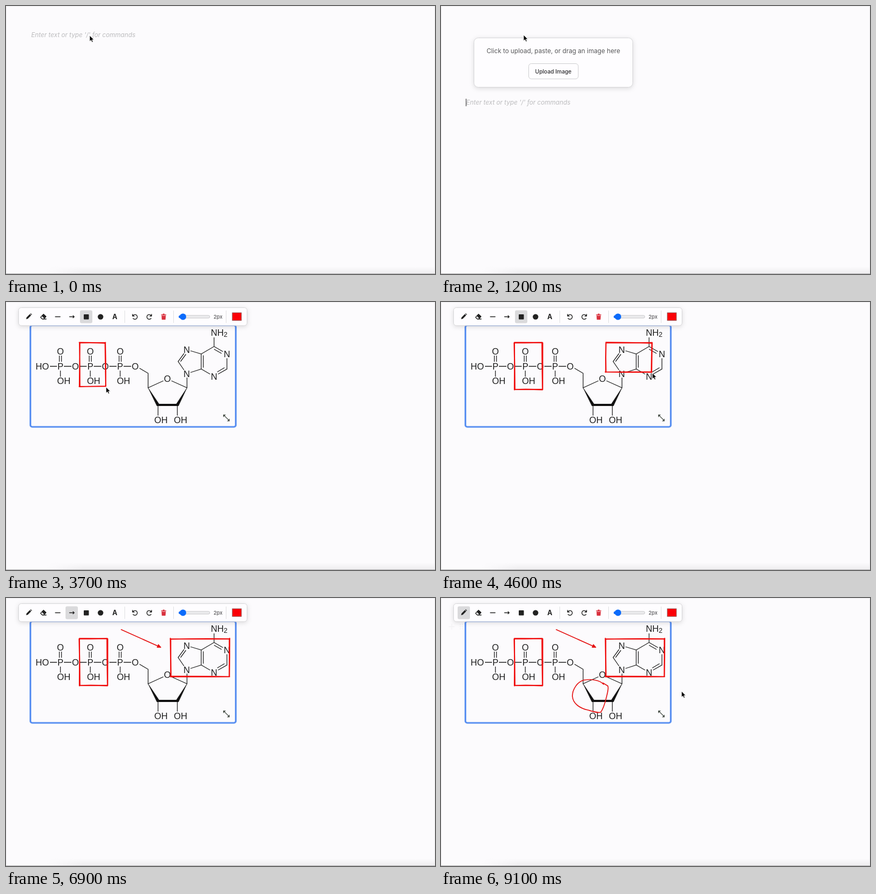
Write an HTML page that moves like this. It is 800 px wide and 500 px high and loops after 9200 ms.

```html
<!DOCTYPE html>
<html lang="en">
<head>
<meta charset="utf-8">
<title>Image annotation in an editor</title>
<style>
html, body { margin: 0; width: 100%; height: 100%; overflow: hidden; background: #fcfbfd; }
svg { display: block; width: 800px; height: 500px; font-family: Inter, "Open Sans", sans-serif; }
.ink { fill: none; stroke: #222; stroke-width: 1.3; }
.atoms { font: 16.6px "Liberation Sans", Arial, sans-serif; fill: #1c1c1c; }
.hint { font-size: 11.75px; font-style: italic; fill: #bcbcbe; }
.typed { font-size: 11.75px; fill: #333; }
.red { fill: none; stroke: #f00a0a; stroke-width: 2.1; stroke-linecap: round; stroke-linejoin: round; }
.thin { stroke: #e51313; stroke-width: 1.7; }
.icon { fill: none; stroke: #222; stroke-width: 1.4; stroke-linecap: round; stroke-linejoin: round; }
.panel { fill: #fefdff; stroke: #d6d6d8; filter: drop-shadow(0 2px 4px rgba(0, 0, 0, .13)); }
.sep { stroke: #dedee0; }
.item { font-size: 11px; font-weight: 500; fill: #3a3a3c; }
.note { font-size: 8.5px; fill: #8a8a8e; }
</style>
</head>
<body>
<svg viewBox="0 0 800 500">
  <defs>
    <linearGradient id="fadeY" x1="0" y1="0" x2="0" y2="1">
      <stop offset="0" stop-color="#000" stop-opacity="0"/>
      <stop offset="1" stop-color="#000" stop-opacity=".055"/>
    </linearGradient>
    <linearGradient id="fadeX">
      <stop offset="0" stop-color="#fcfbfd"/>
      <stop offset="1" stop-color="#fcfbfd" stop-opacity="0"/>
    </linearGradient>
  </defs>
  <rect width="800" height="500" fill="#fcfbfd"/>
  <rect x="75" y="486" width="725" height="13" fill="url(#fadeY)"/>
  <rect x="75" y="486" width="70" height="13" fill="url(#fadeX)"/>
  <path d="M.5 0V499M799.5 0V499M0 .5H800" stroke="#ececee"/>
  <path d="M0 499.5H800" stroke="#aaa9ab"/>

  <g id="handles" stroke="#c2c2c4">
    <path d="M14.5 53.5H25.5M20 48V59" stroke-width="1.3"/>
    <path d="M36 49.5V58M40 49.5V58" stroke-width="2.4" stroke-linecap="round" stroke-dasharray="0 4"/>
  </g>

  <text id="hint" class="hint" x="47">Enter text or type '/' for commands</text>
  <text id="typed" class="typed" x="47" y="57.5"></text>
  <path id="caret" stroke="#444" stroke-width="1.2"/>

  <g id="menu">
    <rect id="menuBox" class="panel" x="50.5" y="70.5" width="232" rx="6"/>
    <rect x="54" y="74" width="225" height="40" rx="4" fill="#efeff1"/>
    <g id="items"></g>
  </g>

  <g id="upload">
    <rect class="panel" x="61.5" y="59.5" width="296" height="92" rx="8"/>
    <text x="209.5" y="88" text-anchor="middle" font-size="11.75" fill="#58585a">Click to upload, paste, or drag an image here</text>
    <rect x="163.5" y="107.5" width="92.5" height="28.5" rx="5" fill="#fefdff" stroke="#cdcdcf"/>
    <text x="209.5" y="125.7" text-anchor="middle" font-size="10.25" font-weight="500" fill="#2c2c2e">Upload Image</text>
  </g>

  <g id="figure">
    <path class="ink" d="M82 120H95M249 123.5L265 133V160L293.5 147M308.5 147L337.5 160V141
      M283.5 192V212M319.5 192V212
      M344 131.5L364 125V97L344 91M332 127L321 111L332 96M325.5 111L335.5 97.5
      M364 97L388 83V66M388 83L404.5 92.5M388 88L402 96M412 105V125L395.5 134.5M407.5 122.5L394 130.5
      M380.5 134.5L364 125M368 122.5V99.5"/>
    <path d="M265 160L281.5 194L285.5 190.5ZM337.5 160L321.5 194L317.5 190.5Z" fill="#111" stroke="#111" stroke-width=".6"/>
    <path d="M282 192H321" stroke="#111" stroke-width="4"/>
    <path id="bonds" class="ink"/>
    <g id="atoms" class="atoms" text-anchor="middle">
      <text x="67.7" y="120">HO</text>
      <text x="382" y="57" text-anchor="start">NH<tspan font-size="12.5" dy="2.5">2</tspan></text>
    </g>
    <rect id="frame" x="45.5" y="43.5" width="383" height="189.5" rx="3.5" fill="none" stroke="#5a90f1" stroke-width="3.2"/>
  </g>

  <g class="red">
    <path id="box1"/>
    <path id="box2"/>
    <path id="arrow" class="thin" fill="#e51313"/>
    <path id="loop" class="thin" d="M303 161C296 153 281 151 267 153C254 156 245 171 245 183C246 198 260 206 274 209
      C284 212 293 215 298 213C304 205 307 191 309 183C311 174 313 168 311 164L302 158.5"/>
  </g>

  <g id="tools">
    <g fill="#4a524a">
      <path d="M407 212L415.5 220.5" stroke="#4a524a" stroke-width="1.3"/>
      <path d="M405 210h5l-5 5zM417 222.500h-5l5-5z"/>
    </g>
    <rect class="panel" x="23.5" y="10.5" width="426" height="33.5" rx="5"/>
    <rect id="pick" x="-11.5" y="15.5" width="23" height="24" rx="3" fill="#dadadc"/>
    <path class="sep" d="M221.5 16V39M312.5 16V39M410.5 16V39"/>
    <path d="M37.500 32l.8-3.2 6.2-6.2 2.4 2.4-6.2 6.2zM45.2 21.9l.9-.9 2.4 2.4-.9.9z" fill="#222"/>
    <g class="icon">
      <path d="M64.5 28.5L70 23L74.5 27.3L70 31.8H67.6Z"/>
      <path d="M67.3 25.8L70 23L74.5 27.3L71.7 30Z" fill="#222"/>
      <path d="M70 31.8H75M92 27.5H101M118.5 27.5H127M125 25.5L127.2 27.5L125 29.5"/>
      <path id="undo" d="M236 23V26.2H239.2M236.4 26A4.4 4.4 0 1 1 237 30.6"/>
      <use href="#undo" transform="translate(507.5)scale(-1 1)"/>
    </g>
    <rect x="145" y="23" width="9.5" height="9.5" rx="1" fill="#222"/>
    <circle cx="176.3" cy="27.6" r="5.2" fill="#222"/>
    <text x="203" y="32.2" text-anchor="middle" font-size="12.5" font-weight="700" fill="#222">A</text>
    <path d="M289.3 23.2h9.4v1.5h-9.4zM292.3 21.8h3.4v1.4h-3.4zM290 25.6h8l-.6 7.4h-6.8z" fill="#d9303e"/>
    <rect x="322.5" y="25" width="57.5" height="5" rx="2.5" fill="#ececee" stroke="#bcbcbe" stroke-width=".8"/>
    <path d="M324.5 27.5H330" stroke="#0b6bfb" stroke-width="5" stroke-linecap="round"/>
    <circle cx="330" cy="27.5" r="6" fill="#0b6bfb"/>
    <text x="387" y="31" font-size="9.5" fill="#3a3a3c">2px</text>
    <rect x="422" y="20" width="17" height="14.5" fill="#fb0007" stroke="#8a5a5a" stroke-width=".9"/>
  </g>

  <path id="cursor" d="M0 0V11L2.6 8.7L4.4 12.5L6.3 11.7L4.6 7.9H7.9Z" stroke="#fff" stroke-width=".8"/>
</svg>

<script>
const LOOP = 9200, STEP = 100, GLIDE = 500;
const $ = id => document.getElementById(id);
const show = (id, on) => { $(id).style.display = on ? '' : 'none'; };
const set = (id, name, value) => $(id).setAttribute(name, value);
const clamp = (v, lo = 0, hi = 1) => Math.min(hi, Math.max(lo, v));
const easeOut = u => 1 - (1 - u) ** 3;
const mix = (a, b, k) => a + (b - a) * k;

// Molecule: atom labels centred on their points, phosphate units repeated
const label = (text, x, y) => `<text x="${x}" y="${y}">${text}</text>`;
const ringN = [[337, 134], [337, 89], [412, 97], [388, 139]];
let bonds = '', labels = label('O', 301, 143.5) + label('OH', 289, 220.5) + label('OH', 325.5, 220.5);
for (const [x, y] of ringN) labels += label('N', x, y);
for (let i = 0; i < 3; i++) {
  const x = 101.5 + i * 55.7;
  bonds += `M${x - 2} 100V111.5M${x + 2} 100V111.5M${x} 128V139.5M${x + 6.5} 120h14`;
  if (i < 2) bonds += `M${x + 35.5} 120h13.5`;
  labels += label('O', x, 92.5) + label('P', x, 120) + label('O', x + 28, 120) + label('OH', x + 6.2, 147.8);
}
set('bonds', 'd', bonds);
$('atoms').insertAdjacentHTML('beforeend', labels);
set('atoms', 'transform', 'translate(0 5.5)');

const entries = [
  ['Image', 'Insert an image'], ['Image grid', 'Show images side by side'],
  ['Heading 1', 'Top-level heading'], ['Heading 2', 'Key section heading'],
  ['Numbered List', 'List with ordered items'], ['Bullet List', 'List with unordered items'],
  ['Check List', 'List with checkboxes'], ['Paragraph', 'The body of your document'],
  ['Table', 'Table with editable cells']
];
$('items').innerHTML = entries.map(([name, note], i) => `<g transform="translate(0 ${74 + i * 43})">
  <rect x="61.5" y="8.5" width="23" height="23" rx="4" fill="#f4f4f6" stroke="#e2e2e4"/>
  <text class="item" x="94" y="18">${name}</text><text class="note" x="94" y="31">${note}</text></g>`).join('');

// Moments of the story
const keyTimes = [400, 500, 600, 800, 900];
const at = { upload: 1100, image: 1600, select: 1800, tools: 2400, rectTool: 2900, box1: 3400, box1End: 3900,
  box2: 4300, box2End: 4900, arrowTool: 5700, arrow: 6100, arrowEnd: 6500, pen: 7200, loop: 7800, loopEnd: 8900 };

// Pointer stops: arrival time and place; it rests, then glides there
const stops = [
  [0, 156, 55], [100, 154, 54], [1200, 154, 54], [1400, 205, 120], [2200, 235.5, 113],
  [at.rectTool, 149, 29], [at.box1, 137, 76], [at.box1End, 190, 164.5], [at.box2, 307, 76],
  [at.box2End, 418, 148], [5500, 145.5, 36], [at.arrowTool, 123, 29], [at.arrow, 215, 59],
  [at.arrowEnd, 289.5, 93.5], [at.pen, 43, 28], [at.loop - STEP, 303, 161]
];
function pointer(t) {
  const i = stops.findIndex(s => s[0] >= t);
  if (i < 1) return stops.at(i).slice(1);
  const [t0, x0, y0] = stops[i - 1], [t1, x1, y1] = stops[i];
  const span = Math.min(GLIDE, t1 - t0), k = easeOut(clamp((t - t1 + span) / span));
  return [mix(x0, x1, k), mix(y0, y1, k)];
}
// A dragged corner trails the pointer slightly
function dragged(t, end) {
  const [x, y] = pointer(Math.min(t, end));
  return [x - 1, y - 1.5];
}

// Block handles fade at the edges of these spans
const hovers = [[0, 600], [1200, 3600], [5300, 6600]];
function handleOpacity(t) {
  const trace = t > at.loop ? .15 : 0;
  return Math.max(trace, ...hovers.map(([a, b]) => clamp(Math.min((t - a) / 300, (b - t) / STEP))));
}

function noise(seed) {
  let s = seed * 7919 + 17;
  return () => (s = (s * 16807) % 2147483647) / 2147483647 - .5;
}

// Two slightly uneven passes, as drawn by hand
function sketchBox(x0, y0, [x1, y1], seed) {
  const rnd = noise(seed), j = v => (v + rnd() * 1.6).toFixed(2);
  const corners = [[x0, y0], [x1, y0], [x1, y1], [x0, y1]];
  let d = '';
  for (let pass = 0; pass < 2; pass++)
    corners.forEach(([x, y], i) => {
      const [nx, ny] = corners[(i + 1) % 4];
      d += `M${j(x)} ${j(y)}Q${j((x + nx) / 2)} ${j((y + ny) / 2)} ${j(nx)} ${j(ny)}`;
    });
  return d;
}

function arrowPath(x0, y0, [x, y]) {
  const a = Math.atan2(y - y0, x - x0);
  const wing = s => `${x - 6.5 * Math.cos(a + s)} ${y - 6.5 * Math.sin(a + s)}`;
  return `M${x0} ${y0}L${x} ${y}L${wing(.42)}L${wing(-.42)}L${x} ${y}`;
}

const loop = $('loop'), loopLen = loop.getTotalLength();

function draw(t) {
  const editing = t < at.upload, uploading = !editing && t < at.image;
  const typed = keyTimes.filter(k => t >= k).length;
  show('hint', t < keyTimes[0] || uploading);
  set('hint', 'y', uploading ? 184.3 : 57.5);
  $('typed').textContent = editing ? '/image'.slice(0, typed) : '';
  show('caret', typed && t < at.image);
  const caretX = 46.8 + (editing ? $('typed').getComputedTextLength() + 1 : 0);
  set('caret', 'd', `M${caretX} ${uploading ? 173 : 46.5}v14`);

  const rows = typed < 3 ? entries.length : typed < 5 ? 2 : 1;
  show('menu', typed && editing);
  set('menuBox', 'height', rows * 43 + 4);
  [...$('items').children].forEach((g, i) => { g.style.display = i < rows ? '' : 'none'; });

  show('upload', uploading);
  show('figure', t >= at.image);
  show('frame', t >= at.select);
  show('tools', t >= at.tools);
  const tool = t < at.rectTool || t >= at.pen ? 42.5 : t < at.arrowTool ? 149.5 : 122.5;
  set('pick', 'transform', `translate(${tool})`);
  set('handles', 'opacity', handleOpacity(t));

  for (const id of ['box1', 'box2', 'arrow', 'loop']) show(id, t > at[id]);
  set('box1', 'd', sketchBox(137, 76, dragged(t, at.box1End), Math.min(t, at.box1End) / STEP));
  set('box2', 'd', sketchBox(307, 76, dragged(t, at.box2End), Math.min(t, at.box2End) / STEP));
  set('arrow', 'd', arrowPath(215, 59, dragged(t, at.arrowEnd)));

  const drawn = clamp((t - at.loop) / (at.loopEnd - at.loop)) * loopLen;
  set('loop', 'stroke-dasharray', `${drawn} ${loopLen + 9}`);

  let [x, y] = pointer(t);
  if (t > at.loop) {
    const pen = loop.getPointAtLength(drawn), leave = easeOut(clamp((t - at.loopEnd) / 200));
    [x, y] = [mix(pen.x, 448.5, leave), mix(pen.y, 174, leave)];
  }
  show('cursor', t < 6800 || t > 7000);
  set('cursor', 'transform', `translate(${x} ${y})`);
}

function tick(now) {
  draw(Math.floor(now % LOOP / STEP) * STEP);
  requestAnimationFrame(tick);
}
draw(0);
requestAnimationFrame(tick);
</script>
</body>
</html>
```
